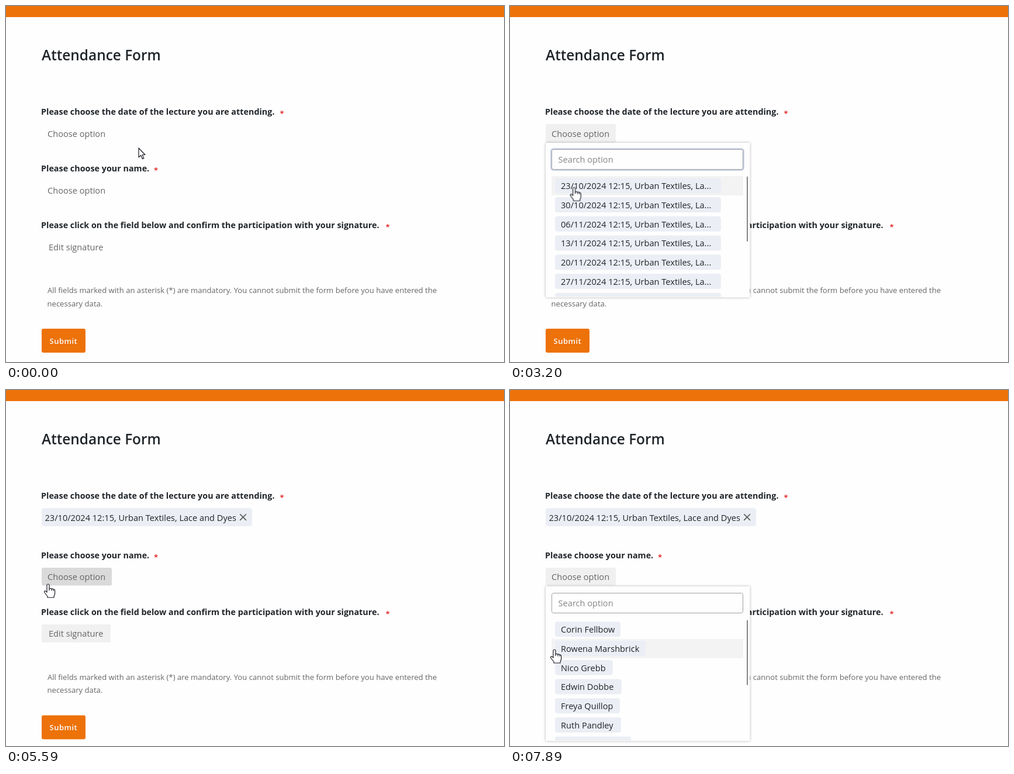
Animation, 852 px wide and 609 px high, one loop 7990 ms. Source, as an HTML page:

```html
<!DOCTYPE html>
<html lang="en">
<head>
<meta charset="utf-8">
<title>Attendance Form</title>
<style>
  html, body { margin: 0; width: 100%; height: 100%; overflow: hidden; background: #fefefe; }
  svg { display: block; }
  text { font: 14.6px "Open Sans", "Noto Sans", sans-serif; fill: #212529; }
  .title { font-size: 24.4px; font-weight: 600; }
  .label { font-size: 14.35px; font-weight: 700; }
  .star { font-size: 13px; font-weight: 700; fill: #e3302f; }
  .muted { fill: #666; }
  .note { font-size: 13.1px; fill: #666; }
  .submit { font-size: 13px; font-weight: 600; letter-spacing: .5px; fill: #fff; }
  .brand { fill: #ed7209; }
  .chip { fill: #ebeef4; }
  .panel { fill: #fefefe; filter: drop-shadow(0 0 2px rgba(0, 0, 0, .3)); }
  .hint { fill: #858585; }
  .row { fill: #f3f3f3; }
  .field { fill: #fefefe; stroke: #a0a0a0; }
  .ring { fill: none; stroke: #a9b9d8; stroke-width: 3; opacity: 0; }
  .caret { fill: #222; }
  .bar { fill: #858585; }
  .check { fill: none; stroke: #7b8b8b; stroke-width: 3; }
  .cross { fill: none; stroke: #555; stroke-width: 1.6; }
  .pointer { fill: #fff; stroke: #1b1b24; stroke-width: 1.2; stroke-linejoin: round; }
</style>
</head>
<body>
<svg width="852" height="609" viewBox="0 0 852 609">
  <rect class="brand" width="852" height="19"/>
  <text class="title" x="61" y="93">Attendance Form</text>

  <text class="label" x="60" y="186">Please choose the date of the lecture you are attending.</text>
  <text class="star" x="468.5" y="189">*</text>
  <g id="dateButton">
    <rect id="dateFill" x="61" y="202" width="120" height="32" rx="3"/>
    <text class="muted" x="71" y="224">Choose option</text>
  </g>
  <g id="dateValue">
    <rect class="chip" x="61" y="202" width="360" height="31" rx="4"/>
    <text id="dateText" x="66.5" y="224"></text>
    <path class="cross" d="M400.3 212.3l10.6 10.6m0-10.6l-10.6 10.6"/>
  </g>

  <g id="lower">
    <text class="label" x="60" y="283">Please choose your name.</text>
    <text class="star" x="253" y="286">*</text>
    <rect id="nameFill" x="61" y="299.5" width="120" height="30.5" rx="3"/>
    <text class="muted" x="71" y="320.9">Choose option</text>
    <text class="label" x="60" y="380">Please click on the field below and confirm the participation with your signature.</text>
    <text class="star" x="649.5" y="383">*</text>
    <rect id="signFill" x="61" y="396.5" width="118" height="31" rx="3"/>
    <text class="muted" x="73" y="417.9">Edit signature</text>
    <text class="note" x="71" y="491">All fields marked with an asterisk (*) are mandatory. You cannot submit the form before you have entered the</text>
    <text class="note" x="70.5" y="513.7">necessary data.</text>
    <rect class="brand" x="61" y="552" width="75" height="41" rx="3"/>
    <text class="submit" x="74.5" y="577.9">Submit</text>
  </g>

  <g id="dates"></g>
  <g id="names"></g>

  <g id="pointer" class="pointer">
    <path id="arrow" d="M0 0V15.8L3.7 12.4 6.4 18.6 8.8 17.5 6.2 11.5H11Z"/>
    <path id="hand" d="M-2 2a2 2 0 0 1 4 0V8q2-1.5 4 .4 2.2-1 3.2.8 2.4-.4 2.4 2.2V16q0 2.5-1.6 4.5V23H-1V21L-6 14.5q-1.2-2.2.6-2.8 1.3-.2 3.4 2.3ZM2 8v3M6 8.4v3M9.2 9.2v2.5"/>
    <path id="beam" fill="none" d="M-3-8h2.2l.8.8.8-.8H3M0-7V7M-3 8h2.2l.8-.8.8.8H3"/>
  </g>
</svg>

<script>
const LENGTH = 7990;
const PICK = 3510;            // first option is chosen, page moves down a little
const SHIFT = 4.5;
const PITCH = 32.75;
const PLAIN = '#fefefe', IDLE = '#f0f0f0', HOVER = '#dadada';
const $ = selector => document.querySelector(selector);

function loop(selector, prop, steps, easing = 'step-end') {
  const frames = steps.map(([time, value, ease = easing]) =>
    ({ offset: time / LENGTH, [prop]: value, easing: ease }));
  frames.push({ ...frames.at(-1), offset: 1 });
  $(selector).animate(frames, { duration: LENGTH, iterations: Infinity });
}

// Visible from each even entry to the following odd one.
function show(selector, ...times) {
  const steps = times.map((time, i) => [time, i % 2 ? 'hidden' : 'visible']);
  if (times[0] > 0) steps.unshift([0, 'hidden']);
  loop(selector, 'visibility', steps);
}

const move = (x, y) => `translate(${x}px, ${y}px)`;

function buildMenu(id, options) {
  const rows = options.map(([label, width], i) => `
    <g transform="translate(0 ${i * PITCH})">
      <rect class="row row${i}" x="10" width="328" height="33" visibility="hidden"/>
      <rect class="chip" x="16" y="3.2" width="${width}" height="26" rx="4"/>
      <text x="26" y="22">${label}</text>
    </g>`).join('');
  $(id).innerHTML = `
    <rect class="panel" width="349.5" height="264.5" rx="2"/>
    <rect class="ring" x="9.5" y="10.5" width="329" height="36" rx="4"/>
    <rect class="field" x="10.5" y="11.5" width="327" height="34" rx="3"/>
    <text class="hint" x="21.6" y="34">Search option</text>
    <rect class="caret" x="22" y="18" width="1" height="20"/>
    <svg y="57" width="349" height="206.5">${rows}</svg>
    <rect class="bar" x="344" y="57.5" width="2" height="111.5" rx="1"/>`;
}

const course = 'Urban Textiles, Lace and Dyes';
const days = ['23/10', '30/10', '06/11', '13/11', '20/11', '27/11', '04/12'];
const dateOption = day => `${day}/2024 12:15, ${course}`;
$('#dateText').textContent = dateOption(days[0]);

buildMenu('#dates', days.map(day =>
  [dateOption(day).replace(/(, La).*/, '$1...'), 284]));
buildMenu('#names', [
  ['Corin Fellbow', 112], ['Rowena Marshbrick', 155], ['Nico Grebb', 99],
  ['Edwin Dobbe', 114], ['Freya Quillop', 111], ['Ruth Pandley', 113],
  ['Isobel Tarnwick', 130]
]);
$('#dates').insertAdjacentHTML('beforeend',
  '<path class="check" d="M318.5 74l5.5 5.5 11.5-11.5"/>');

// Form
show('#dateButton', 0, PICK);
show('#dateValue', PICK);
loop('#lower', 'transform', [[0, move(0, 0)], [PICK, move(0, SHIFT)]]);
loop('#dateFill', 'fill',
  [[0, PLAIN], [1320, PLAIN], [1590, HOVER], [2885, HOVER], [3085, IDLE]], 'linear');
loop('#nameFill', 'fill',
  [[0, PLAIN], [PICK, PLAIN], [PICK, IDLE], [5365, IDLE], [5580, HOVER], [6630, HOVER], [6830, IDLE]], 'linear');
loop('#signFill', 'fill', [[0, PLAIN], [PICK, IDLE]]);

// Date menu
show('#dates', 2300, 4850);
loop('#dates', 'transform', [[0, move(61, 234)], [PICK, move(61, 234 + SHIFT)]]);
show('#dates .caret', 2300, 2800, 3260, PICK);
show('#dates .row0', 3095, 4535);
show('#dates .check', PICK, 4850);
loop('#dates .ring', 'opacity', [[0, 0], [2300, 0], [2500, .6], [PICK, .6], [3700, 0]], 'linear');
loop('#dates .bar', 'opacity', [[0, .1], [2300, .1], [2500, 1]], 'linear');

// Name menu
show('#names', 6020);
loop('#names', 'transform', [[0, move(61, 336)]]);
show('#names .caret', 6020, 6520, 7060, 7600);
show('#names .row0', 6933, 7077);
show('#names .row1', 7077);
loop('#names .ring', 'opacity', [[0, 0], [6020, 0], [6220, .6], [7840, .6], [7890, 0]], 'linear');
loop('#names .bar', 'opacity', [[0, .1], [6020, .1], [6260, 1]], 'linear');

// Pointer
loop('#pointer', 'transform', [
  [0, 227, 243], [500, 227, 243, 'linear'], [1110, 175, 236, 'linear'], [1290, 148, 233, 'linear'],
  [1320, 146, 232, 'ease-out'], [1480, 127, 227], [2790, 127, 227], [3260, 109, 313],
  [4290, 109, 313], [4690, 53, 323], [5290, 53, 323], [5450, 72, 332],
  [6530, 72, 332], [7290, 76, 444]
].map(([time, x, y, ease]) => [time, move(x, y), ease]), 'ease-in-out');
show('#arrow', 0, 1320, 2885, 2940, 3058, 3095, 4535, 5365, 6630, 6720, 6880, 6933);
show('#hand', 1320, 2885, 3095, 4535, 5365, 6630, 6933);
show('#beam', 2940, 3058, 6720, 6880);
</script>
</body>
</html>
```
